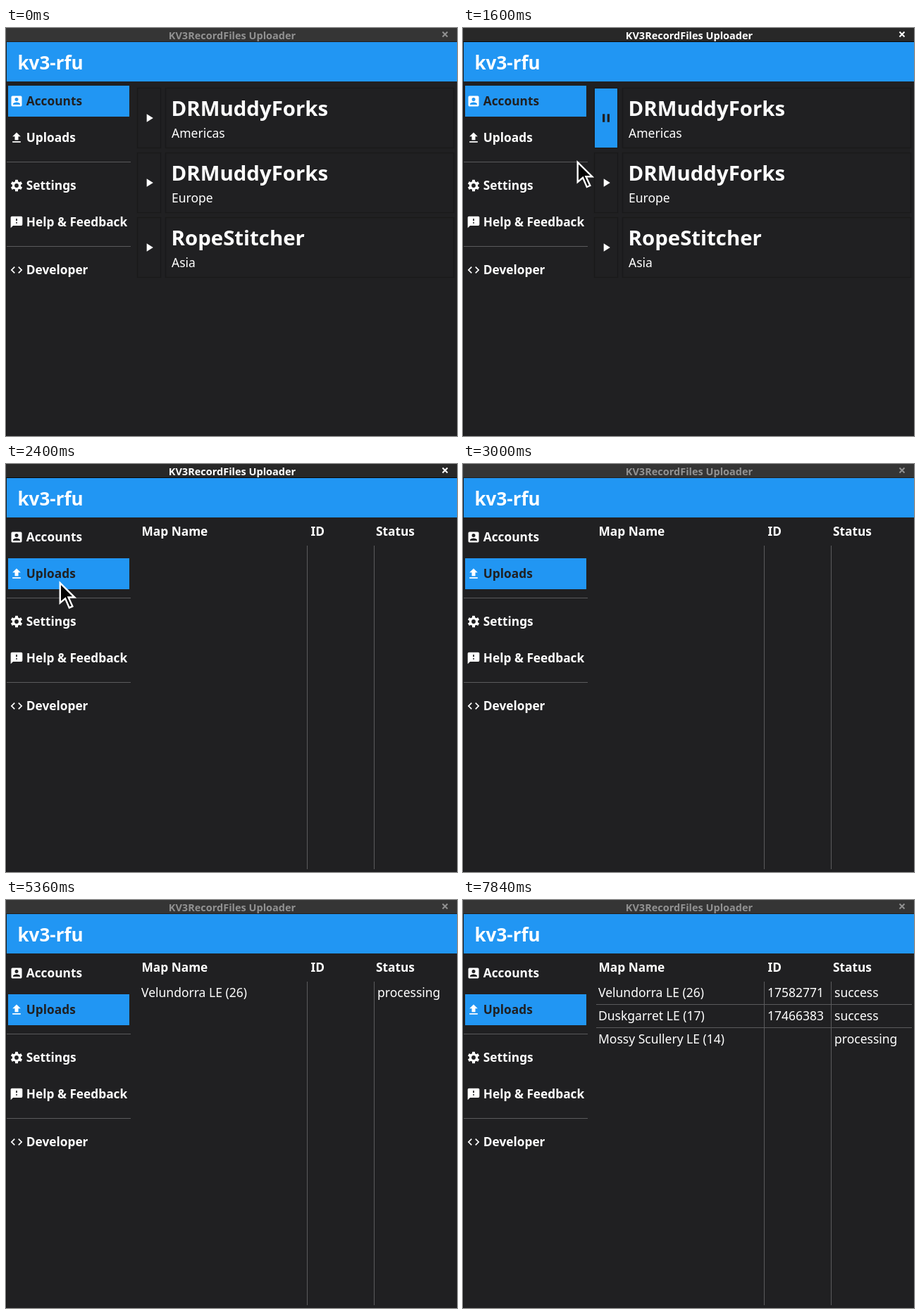
Animation, 640 px wide and 580 px high, one loop 8 s. Source, as an HTML page:

```html
<!DOCTYPE html>
<html lang="en">
<head>
<meta charset="utf-8">
<title>Uploader</title>
<style>
  html, body { margin: 0; width: 100%; height: 100%; overflow: hidden; background: #202022; }
  svg { display: block; width: 640px; height: 580px; font-family: "Noto Sans", sans-serif; font-size: 17.5px; }
  text { white-space: pre; }
</style>
</head>
<body>
<svg id="stage" viewBox="0 0 640 580"></svg>
<script>
const LOOP = 8000, TICK = 40;
const BG = '#202022', BLUE = '#2196f3', HOVER = '#2d2d2f', LINE = '#5a5a5c';
const stage = document.getElementById('stage');

const ICONS = {
  account: 'M3 5v14a2 2 0 0 0 2 2h14a2 2 0 0 0 2-2V5a2 2 0 0 0-2-2H5a2 2 0 0 0-2 2zm12 4a3 3 0 1 1-6 0 3 3 0 0 1 6 0zm-9 8c0-2 4-3.1 6-3.1s6 1.1 6 3.1v1H6z',
  upload: 'M9 16h6v-6h4l-7-7-7 7h4zm-4 2h14v2H5z',
  feedback: 'M20 2H4a2 2 0 0 0-2 2v18l4-4h14a2 2 0 0 0 2-2V4a2 2 0 0 0-2-2zm-7 12h-2v-2h2zm0-4h-2V6h2z',
  code: 'M9.4 16.6 4.8 12l4.6-4.6L8 6l-6 6 6 6zm5.2 0 4.6-4.6-4.6-4.6L16 6l6 6-6 6z',
  play: 'M8 5v14l11-7z',
  pause: 'M6 5h4v14H6zm8 0h4v14h-4z'
};

const NAV = [
  { label: 'Accounts', icon: 'account', y: 104 },
  { label: 'Uploads', icon: 'upload', y: 156 },
  { label: 'Settings', icon: 'gear', y: 224 },
  { label: 'Help &amp; Feedback', icon: 'feedback', y: 276 },
  { label: 'Developer', icon: 'code', y: 344 }
];

const ACCOUNTS = [
  { name: 'DRMuddyForks', region: 'Americas', startsAt: 800 },
  { name: 'DRMuddyForks', region: 'Europe', startsAt: 1880 },
  { name: 'RopeStitcher', region: 'Asia', startsAt: Infinity }
];

// Times: pending, uploading, processing, success
const UPLOADS = [
  { map: 'Velundorra LE (26)', id: '17582771', times: [4880, 5080, 5360, 5840] },
  { map: 'Duskgarret LE (17)', id: '17466383', times: [6320, 6520, 6760, 7200] },
  { map: 'Mossy Scullery LE (14)', id: '', times: [7440, 7600, 7840, Infinity] }
];
const STATUS = ['pending', 'uploading', 'processing', 'success'];

const FOCUS = [320, 3000], PAGE_SWITCH = 2280, POINTER_GONE = 2640;
const POINTER = [
  [320, 8, 177], [520, 203, 146], [880, 203, 146], [1080, 132, 163], [1480, 132, 163],
  [1720, 191, 213], [1880, 191, 213], [2000, 112.5, 159.5], [2280, 112.5, 159.5], [2640, -30, 186]
];

const rect = (x, y, w, h, fill, extra = '') =>
  `<rect x="${x}" y="${y}" width="${w}" height="${h}" fill="${fill}" ${extra}/>`;
const text = (x, y, str, { bold = false, size = bold ? 17.3 : 17.5, fill = '#fff', anchor = 'start' } = {}) =>
  `<text x="${x}" y="${y}" font-size="${size}" font-weight="${bold ? 700 : 400}" fill="${fill}" text-anchor="${anchor}">${str}</text>`;
const frame = (x, y, w, h) =>
  rect(x + .5, y + .5, w - 1, h - 1, 'none', 'stroke="#19191a" stroke-width="1.4"');

function gear() {
  const teeth = [0, 60, 120].map(a =>
    `<rect x="9.6" y="2" width="4.8" height="20" rx=".6" transform="rotate(${a} 12 12)"/>`).join('');
  return `${teeth}<circle cx="12" cy="12" r="7.4"/><circle cx="12" cy="12" r="3.5" fill="${BG}"/>`;
}

function icon(name, cx, cy, fill = '#fff') {
  const shape = name === 'gear' ? gear() : `<path fill-rule="evenodd" d="${ICONS[name]}"/>`;
  return `<g fill="${fill}" transform="translate(${cx - 10} ${cy - 10}) scale(${20 / 24})">${shape}</g>`;
}

function pointerAt(t) {
  if (t < POINTER[0][0] || t >= POINTER_GONE) return null;
  const i = POINTER.findIndex(k => k[0] > t);
  const [t0, x0, y0] = POINTER[i - 1], [t1, x1, y1] = POINTER[i];
  const p = (t - t0) / (t1 - t0), e = p * p * (3 - 2 * p);
  return { x: x0 + (x1 - x0) * e, y: y0 + (y1 - y0) * e };
}

const over = (p, x, y, w, h) => p && p.x >= x && p.x < x + w && p.y >= y && p.y < y + h;

function titleBar(focused) {
  const ink = focused ? '#fff' : '#919191';
  return rect(0, 0, 640, 20, focused ? '#282828' : '#353535') +
    rect(0, 19, 640, 1, focused ? '#070707' : '#202020') +
    text(321, 15.5, 'KV3RecordFiles Uploader', { size: 14.5, bold: true, fill: ink, anchor: 'middle' }) +
    `<path d="M619.5 5.5l7 7m0-7l-7 7" stroke="${ink}" stroke-width="2"/>`;
}

function sidebar(selected, pointer) {
  const items = NAV.map(({ label, icon: name, y }, i) => {
    const active = i === selected;
    const fill = active ? BLUE : over(pointer, 3, y - 22, 172, 44) ? HOVER : 'none';
    return rect(3, y - 22, 172, 44, fill) + icon(name, 15, y) +
      text(28.8, y + 6, label, { bold: true, fill: active ? BG : '#fff' });
  });
  return items.join('') + rect(1, 190, 176, 1, LINE) + rect(1, 310, 176, 1, LINE);
}

function accountsPage(t, pointer) {
  return ACCOUNTS.map(({ name, region, startsAt }, i) => {
    const y = 85 + 92 * i, on = t >= startsAt;
    const fill = on ? BLUE : over(pointer, 187, y + 1, 32, 84) ? HOVER : 'none';
    return frame(186, y, 34, 86) + rect(187, y + 1, 32, 84, fill) +
      icon(on ? 'pause' : 'play', 203, y + 43, on ? BG : '#fff') +
      frame(226, y, 410, 86) +
      text(234.6, y + 40, name, { size: 29.4, bold: true }) +
      text(235, y + 71, region);
  }).join('');
}

function uploadsPage(t) {
  const bold = { bold: true };
  const head = text(192.5, 102, 'Map Name', bold) + text(432.5, 102, 'ID', bold) + text(525, 102, 'Status', bold) +
    rect(427, 116, 1, 460, LINE) + rect(522, 116, 1, 460, LINE);
  return head + UPLOADS.map(({ map, id, times }, i) => {
    const step = times.filter(at => t >= at).length - 1, y = 138 + 33 * i;
    if (step < 0) return '';
    return (i ? rect(189, y - 23, 448, 1, LINE) : '') + text(192, y, map) +
      (step === 3 ? text(432, y, id) : '') + text(527, y, STATUS[step]);
  }).join('');
}

const arrow = ({ x, y }) =>
  `<path transform="translate(${x} ${y})" d="M1.2 2.8V31L8.6 24.8 14.3 38 18.8 36 13 23.2H21.8Z" fill="#050505" stroke="#fff" stroke-width="2.4"/>`;

function scene(t) {
  const pointer = pointerAt(t), onUploads = t >= PAGE_SWITCH;
  return rect(0, 0, 640, 580, BG) +
    titleBar(t >= FOCUS[0] && t < FOCUS[1]) +
    rect(1, 20, 639, 56, BLUE) +
    text(16.5, 59, 'kv3-rfu', { size: 26, bold: true }) +
    sidebar(onUploads ? 1 : 0, pointer) +
    (onUploads ? uploadsPage(t) : accountsPage(t, pointer)) +
    rect(0, 20, 1, 560, '#171718') +
    (pointer ? arrow(pointer) : '');
}

const start = performance.now();
let shown = -1;
function draw() {
  const tick = Math.floor((performance.now() - start) % LOOP / TICK);
  if (tick !== shown) {
    shown = tick;
    stage.innerHTML = scene(tick * TICK);
  }
  requestAnimationFrame(draw);
}
draw();
</script>
</body>
</html>
```
